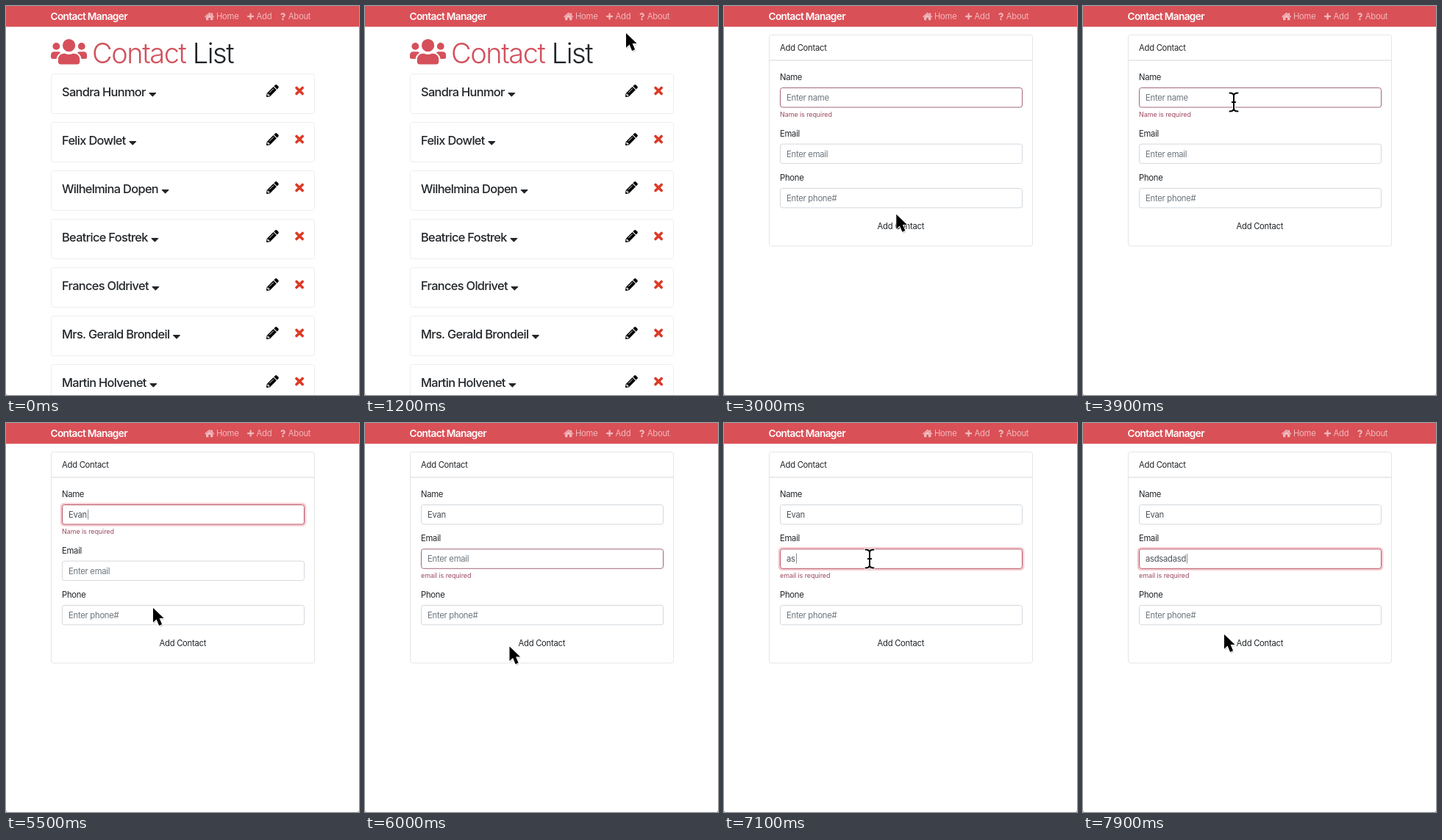
Write an HTML page that moves like this. It is 480 px wide and 530 px high and loops after 8 s.

```html
<!DOCTYPE html>
<html lang="en">
<head>
<meta charset="utf-8">
<title>Contact Manager</title>
<style>
html, body { margin: 0; width: 100%; height: 100%; overflow: hidden; background: #fff; }
svg { display: block; width: 480px; height: 530px; }
text { font: 400 11.27px Inter, "Open Sans", sans-serif; letter-spacing: -.27px; font-optical-sizing: none; fill: #212529; white-space: pre; }
.brand { font-size: 13.7px; font-weight: 600; letter-spacing: -.68px; fill: #fff; }
.title { font-size: 38px; font-weight: 300; letter-spacing: -1.45px; }
.row { font-size: 16.4px; font-weight: 500; letter-spacing: -.68px; }
.error { font-size: 9px; letter-spacing: -.1px; fill: #9c4a60; }
.hint { fill: #6c757d; }
.value { fill: #495057; }
.link, .link text { fill: #fff; }
.card { fill: #fff; stroke: #e5e5e5; }
#list .card { stroke: #eee; }
.input { fill: #fff; stroke: #d3d8dd; }
.invalid { stroke: #a2677a; }
.focus { stroke: #b95566; }
.ring { fill: none; stroke: #f5cdd3; stroke-width: 2.6; }
</style>
</head>
<body>
<svg viewBox="0 0 480 530">
  <defs>
    <g id="users" fill="#d5505b">
      <circle cx="96" cy="160" r="64"/><circle cx="544" cy="160" r="64"/><circle cx="320" cy="144" r="112"/>
      <path d="M128 432v-29q0-115 115-115h8q69 32 138 0h8q115 0 115 115v29q0 48-48 48H176q-48 0-48-48z"/>
      <path id="side" d="M98 384H32q-32 0-32-32v-32q0-64 64-64h64q26 0 45 19-65 36-75 109z"/>
      <use href="#side" transform="matrix(-1 0 0 1 640 0)"/>
    </g>
    <g id="pencil">
      <path d="M314 69l54-54q34-29 68 0l60 60q30 34 0 68l-54 54zM292 92l128 128-270 270-122 22q-28 0-28-28l22-122z"/>
      <path d="M40 440l11-64h37v48h48v36l-64 12z" fill="#fff"/>
      <path d="M134 330l154-154" stroke="#fff" stroke-width="28" stroke-linecap="round"/>
    </g>
    <g id="arrow">
      <path d="M1 2V22l4.6-4.4 3.6 8.6 4-1.7-3.6-8.3h6z" opacity=".16"/>
      <path d="M0 0V19.8l4.6-4.2 3.5 8.3 4-1.7-3.5-8.1h6z" stroke="#fff" stroke-width="1.6" paint-order="stroke"/>
    </g>
    <path id="stem" d="M-5.5-12.5q5.5 0 5.5 4v17q0 4-5.5 4M5.5-12.5q-5.5 0-5.5 4M0 8.5q0 4 5.5 4M-2.2 0h4.4" fill="none" stroke-linecap="round"/>
    <g id="beam">
      <use href="#stem" stroke="#fff" stroke-width="4"/>
      <use href="#stem" stroke="#000" stroke-width="2"/>
    </g>
  </defs>
  <rect width="480" height="530" fill="#fff"/>
  <g id="list">
    <use href="#users" transform="translate(61 42.6) scale(.0768)"/>
    <text class="title" x="117" y="77.5"><tspan fill="#d1525d">Contact</tspan> List</text>
    <g id="rows"></g>
  </g>
  <g id="form"></g>
  <rect width="480" height="28.3" fill="#da5057"/>
  <text class="brand" x="60.5" y="19">Contact Manager</text>
  <g class="link" opacity=".6">
    <path d="M270 14.5l6.7-5.8 2.6 2.2v-1.3h1.8v2.9l2.3 2-.8.9-5.9-5-5.9 5zM272 15l4.7-4 4.7 4v4.2h-3.4v-3.3h-2.6v3.3H272z"/>
    <text x="286" y="18">Home</text>
  </g>
  <g class="link" id="add">
    <path d="M331.5 9.8h2.2v3.3h3.3v2.2h-3.3v3.3h-2.2v-3.3h-3.3v-2.2h3.3z"/>
    <text x="340.5" y="18">Add</text>
  </g>
  <g class="link" opacity=".6">
    <path d="M374 11.9q2.3-2.9 4.4-.7 1.3 1.9-1.2 3.1-.8.5-.8 1.4" fill="none" stroke="#fff" stroke-width="2"/>
    <circle cx="376.4" cy="18.1" r="1.3"/>
    <text x="383.8" y="18">About</text>
  </g>
  <path d="M0 527.5q0 2.5 2.5 2.5H0zM480 527.5q0 2.5-2.5 2.5h2.5z" fill="#999"/>
  <use id="cursor"/>
</svg>
<script>
const LOOP = 8000, STEP = 100;
const SHOW_FORM = 1700, NAME_ERROR = 3000, NAME_FOCUS = 4100, EMAIL_ERROR = 5900, EMAIL_FOCUS = 6700;
const $ = id => document.getElementById(id);
const contacts = ["Sandra Hunmor", "Felix Dowlet", "Wilhelmina Dopen", "Beatrice Fostrek",
  "Frances Oldrivet", "Mrs. Gerald Brondeil", "Martin Holvenet"];

// [time, x, y] of the pointer
const path = [[700, 400, 150], [1000, 364, 62], [1200, 355, 37], [1500, 346, 15], [1900, 344, 16],
  [2300, 266, 144], [2700, 236, 283], [3100, 234, 284], [3500, 222, 220], [3900, 205, 131],
  [5200, 205, 131], [5500, 200, 252], [5700, 199, 318], [5900, 197, 303], [6100, 196, 306],
  [6400, 198, 206], [6600, 198, 185], [7200, 198, 185], [7900, 192, 288]];
const beamTimes = [[2200, 2500], [3700, 5300], [6600, 7300]];

const within = (t, [from, to]) => t >= from && t < to;
const ease = p => p * p * (3 - 2 * p);
const text = (x, y, s, cls = "") => `<text class="${cls}" x="${x}" y="${y}">${s}</text>`;
const typed = (s, t, start, gap) => s.slice(0, Math.max(0, Math.floor((t - start) / gap) + 1));

function pointerAt(t) {
  const i = path.findIndex(k => k[0] >= t);
  if (i <= 0) return path[i < 0 ? path.length - 1 : 0].slice(1);
  const [a, b] = [path[i - 1], path[i]];
  const p = ease((t - a[0]) / (b[0] - a[0]));
  return [a[1] + (b[1] - a[1]) * p, a[2] + (b[2] - a[2]) * p];
}

function buildRows() {
  $("rows").innerHTML = contacts.map((name, i) => `<g transform="translate(0 ${66 * i})">
    <rect class="card" x="61.5" y="92.5" width="358" height="54" rx="3"/>
    ${text(76, 123, name, "row")}
    <path class="caret" d="M.5 0h8.6l-4.3 4.3z" fill="#212529" stroke="#212529" stroke-width="1.2" stroke-linejoin="round"/>
    <use href="#pencil" transform="translate(354 107) scale(.033)"/>
    <path d="M395 111.4l8.2 8.2m0-8.2l-8.2 8.2" stroke="#dc3a26" stroke-width="3.6" stroke-linecap="round"/>
  </g>`).join("");
  for (const row of $("rows").children) {
    const end = 76 + row.querySelector("text").getComputedTextLength();
    row.querySelector(".caret").setAttribute("transform", `translate(${end + 4.8} 118.5)`);
  }
}

function field(y, { label, hint, value, error, focus }) {
  const state = focus ? "focus" : error ? "invalid" : "";
  const ring = focus ? `<rect class="ring" x="75" y="${y + 12.5}" width="332" height="29.5" rx="4"/>` : "";
  const content = value ? value + (focus ? '<tspan font-weight="300">|</tspan>' : "") : hint;
  return text(76, y + 3.5, label) + ring +
    `<rect class="input ${state}" x="76.5" y="${y + 14}" width="329" height="26.5" rx="3"/>` +
    text(85, y + 31.5, content, value ? "value" : "hint") +
    (error ? text(76, y + 53, error, "error") : "");
}

function formAt(t) {
  const nameBad = within(t, [NAME_ERROR, EMAIL_ERROR]), emailBad = t >= EMAIL_ERROR;
  const fields = [
    { label: "Name", hint: "Enter name", value: typed("Evan", t, 4600, 150),
      error: nameBad && "Name is required", focus: within(t, [NAME_FOCUS, EMAIL_ERROR]) },
    { label: "Email", hint: "Enter email", value: typed("asdsadasd", t, 7000, 80),
      error: emailBad && "email is required", focus: t >= EMAIL_FOCUS },
    { label: "Phone", hint: "Enter phone#" }
  ];
  const grow = nameBad || emailBad ? 16.5 : 0;
  let y = 97.5, body = "";
  for (const f of fields) {
    body += field(y, f);
    y += 60.3 + (f.error ? 16.3 : 0);
  }
  return `<rect class="card" x="61.5" y="39.5" width="358" height="${271 + grow}" rx="3"/>
    <path d="M62 74h357" stroke="#e5e5e5" stroke-width="1.4"/>` +
    text(76, 61, "Add Contact") + body + text(208.5, 287.5 + grow, "Add Contact");
}

function draw(t) {
  const onForm = t >= SHOW_FORM;
  $("list").style.display = onForm ? "none" : "";
  $("form").innerHTML = onForm ? formAt(t) : "";
  $("add").setAttribute("opacity", within(t, [1400, NAME_ERROR]) ? .92 : .6);
  const [x, y] = pointerAt(t), cursor = $("cursor");
  cursor.style.display = t < path[0][0] ? "none" : "";
  cursor.setAttribute("href", beamTimes.some(span => within(t, span)) ? "#beam" : "#arrow");
  cursor.setAttribute("transform", `translate(${x} ${y})`);
}

buildRows();
const start = performance.now();
let shown = -1;
function tick() {
  const t = Math.floor((performance.now() - start) % LOOP / STEP) * STEP;
  if (t !== shown) draw(shown = t);
  requestAnimationFrame(tick);
}
tick();
</script>
</body>
</html>
```
